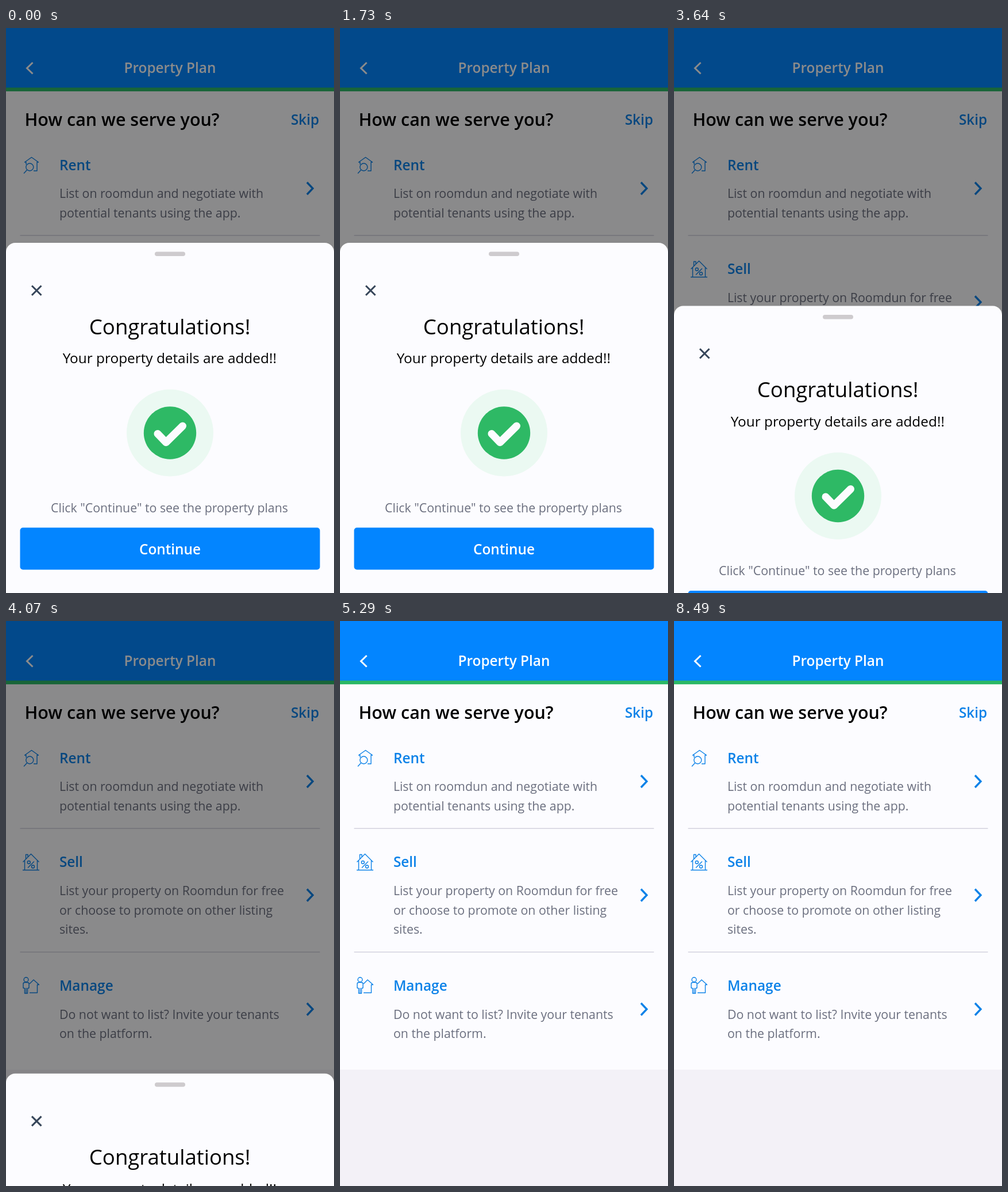
An HTML page for the animation above (8.54 s loop, 571 by 981 pixels).

```html
<!DOCTYPE html>
<html lang="en">
<head>
<meta charset="utf-8">
<title>Property Plan</title>
<style>
  html, body { margin: 0; width: 100%; height: 100%; overflow: hidden; background: #f3f1f7; }
  svg { display: block; font-family: "Open Sans", sans-serif; }
  .title { font-size: 24.36px; font-weight: 600; }
  .body { font-size: 21.32px; fill: #6b6f7f; }
  .link { fill: #0c82e8; }
  .mid { text-anchor: middle; }
  .line { fill: none; stroke: #0c82e8; stroke-width: 1.4; stroke-linejoin: round; }
  .arrow { fill: none; stroke: #0c82e8; stroke-width: 3.4; }
  .rule { stroke: #d3d2de; stroke-width: 1.5; }
</style>
</head>
<body>
<svg width="571" height="981" viewBox="0 0 571 981">
  <rect width="571" height="779" fill="#fcfcff"/>
  <rect width="571" height="104" fill="#0385ff"/>
  <rect y="103.5" width="571" height="6.4" fill="#2bb866"/>
  <path d="M46.5 60 36.5 69.7l10 9.8" fill="none" stroke="#fff" stroke-width="3"/>
  <text class="title mid" x="285.5" y="77.6" fill="#fff">Property Plan</text>
  <text x="32.5" y="169.5" font-size="30.45" font-weight="600">How can we serve you?</text>
  <text class="title link" x="545.2" y="167.5" text-anchor="end">Skip</text>

  <g class="line">
    <path d="M35 237v-4h-2.5l12-8.5 12 8.5H54v15h-6M36.5 246.5 31 252.5"/>
    <circle cx="41.3" cy="241.5" r="6.5"/>
  </g>
  <text class="title link" x="92.9" y="246.7">Rent</text>
  <text class="body" x="92.9" y="295">List on roomdun and negotiate with</text>
  <text class="body" x="92.9" y="328.5">potential tenants using the app.</text>
  <path class="arrow" d="m524 268 10 10.5-10 10.5"/>
  <path class="rule" d="M24.5 360.3h522"/>

  <g class="line">
    <path d="M29.5 418.5 43.5 404.5l14 14M32.500 416v16M54.5 416v16M29 432.5h29M34.5 413v-7.500h3.500v4M38 428.5l11-11"/>
    <circle cx="39.8" cy="419" r="2.5"/>
    <circle cx="47" cy="426.5" r="2.5"/>
  </g>
  <text class="title link" x="92.9" y="427.4">Sell</text>
  <text class="body" x="92.9" y="476.2">List your property on Roomdun for free</text>
  <text class="body" x="92.9" y="509.6">or choose to promote on other listing</text>
  <text class="body" x="92.9" y="543">sites.</text>
  <path class="arrow" d="m524 465.5 10 10.5-10 10.5"/>
  <path class="rule" d="M24.5 574.7h522"/>

  <g class="line">
    <circle cx="35" cy="622.7" r="3.9"/>
    <path d="M32.5 646.5v-8.5l-2.5-1v-7q0-2.5 3-2.5h4q3 0 3 2.500v7l-2.5 1v8.500zM35 637v9.5M41 630l7-7 9.500 8.500h-3v14H41"/>
  </g>
  <text class="title link" x="92.9" y="641.5">Manage</text>
  <text class="body" x="92.9" y="691">Do not want to list? Invite your tenants</text>
  <text class="body" x="92.9" y="724.4">on the platform.</text>
  <path class="arrow" d="m524 663.5 10 10.5-10 10.5"/>

  <g id="modal">
    <rect width="571" height="981" fill="#000" fill-opacity=".455"/>
    <g id="sheet">
      <rect width="571" height="640" rx="16" fill="#fcfcff"/>
      <rect x="259" y="15.5" width="53" height="7.5" rx="3.75" fill="#cecbce"/>
      <path d="m45 74.5 16.500 16.500m0-16.500L45 91" stroke="#37465a" stroke-width="3.1"/>
      <text class="mid" x="285.2" y="158.5" font-size="36.54">Congratulations!</text>
      <text class="mid" x="284.8" y="209.2" font-size="24.36">Your property details are added!!</text>
      <circle cx="285.5" cy="330" r="75.5" fill="#ebf9f2"/>
      <circle cx="285.5" cy="330" r="45.7" fill="#2eb965"/>
      <path d="m264 331.5 14.500 15 29-28.500" fill="none" stroke="#fcfcff" stroke-width="13" stroke-linecap="round" stroke-linejoin="round"/>
      <text class="body mid" x="284.5" y="468">Click "Continue" to see the property plans</text>
      <rect x="24.5" y="494.5" width="522" height="73" rx="5" fill="#0385ff"/>
      <text class="title mid" x="285.5" y="541" fill="#fff">Continue</text>
    </g>
  </g>
</svg>
<script>
  const LOOP = 8540, CLOSE_START = 3303, CLOSE_TIME = 1246;
  const SHEET_TOP = 373, SHEET_HEIGHT = 608;
  const modal = document.getElementById("modal");
  const sheet = document.getElementById("sheet");

  const easeIn = x => x ** 1.67;
  const easeInOut = x => x < .5 ? easeIn(2 * x) / 2 : 1 - easeIn(2 - 2 * x) / 2;

  function draw() {
    const time = performance.now() % LOOP;
    const progress = Math.min(1, Math.max(0, (time - CLOSE_START) / CLOSE_TIME));
    const y = SHEET_TOP + SHEET_HEIGHT * easeInOut(progress);
    sheet.setAttribute("transform", `translate(0 ${y.toFixed(2)})`);
    modal.setAttribute("visibility", progress < 1 ? "visible" : "hidden");
    requestAnimationFrame(draw);
  }
  draw();
</script>
</body>
</html>
```
